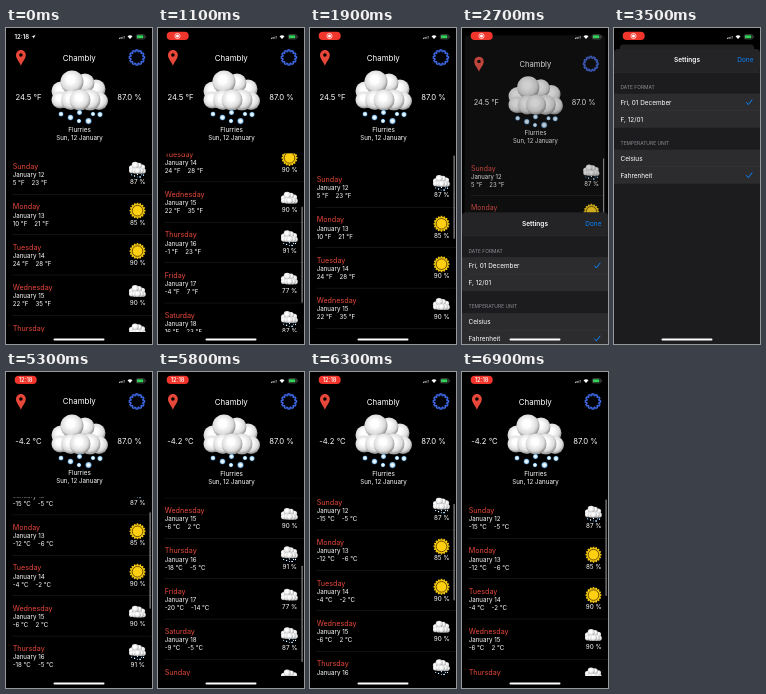
An HTML page for the animation above (7 s loop, 146 by 316 pixels).

```html
<!DOCTYPE html>
<html lang="en">
<head>
<meta charset="utf-8">
<title>Weather</title>
<style>
  html, body { margin: 0; width: 100%; height: 100%; overflow: hidden; background: #000; }
  svg { display: block; width: 146px; height: 316px; }
  text { font-family: Inter, Roboto, "Liberation Sans", sans-serif; }
</style>
</head>
<body>
<svg id="stage" viewBox="0 0 146 316"></svg>
<script>
const W = 146, H = 316, LOOP = 7000;
const LIST = { top: 125.5, bottom: 304, row: 40.4 };
const SHEET_TOP = 21;
const RED = '#e8483a', BLUE = '#0a84ff';

// day, date, low, high (Fahrenheit), humidity, icon
const days = [
  ['Sunday', 12, 5, 23, 87, 'snow'], ['Monday', 13, 10, 21, 85, 'sun'],
  ['Tuesday', 14, 24, 28, 90, 'sun'], ['Wednesday', 15, 22, 35, 90, 'cloud'],
  ['Thursday', 16, -1, 23, 91, 'snow'], ['Friday', 17, -4, 7, 77, 'cloud'],
  ['Saturday', 18, 16, 23, 87, 'snow'], ['Sunday', 19, 12, 20, 87, 'cloud']
];

const text = (x, y, size, str, fill = '#fff', anchor = 'start', weight = 400) =>
  `<text x="${x}" y="${y}" font-size="${size}" fill="${fill}" text-anchor="${anchor}" font-weight="${weight}">${str}</text>`;
const rect = (x, y, w, h, fill, rx = 0, extra = '') =>
  `<rect x="${x}" y="${y}" width="${w}" height="${h}" rx="${rx}" fill="${fill}" ${extra}/>`;
const circle = (x, y, r, attrs) => `<circle cx="${x}" cy="${y}" r="${r}" ${attrs}/>`;
const balls = (list, fill) => list.map(([x, y, r]) => circle(x, y, r, `fill="url(#${fill})"`)).join('');

// Toothed outline alternating between two radii
function cog(x, y, n, inner, outer, duty) {
  const pts = [];
  for (let i = 0; i < n; i++)
    for (const [k, r] of [[-1, inner], [-duty, outer], [duty, outer], [1, inner]]) {
      const a = (i + k * 0.4) * 2 * Math.PI / n;
      pts.push((x + r * Math.cos(a)).toFixed(2) + ',' + (y + r * Math.sin(a)).toFixed(2));
    }
  return pts.join(' ');
}

const clouds =
  balls([[90, 61, 9.5], [79, 55, 9.5], [55, 63, 9.5], [66, 54, 11.5]], 'puff') +
  `<path d="M54 70h42v10h-42z" fill="#b5b5b5"/>` +
  balls([[54, 72, 8.5], [93, 73, 9], [65, 72, 10], [84, 72, 10.5], [74, 72, 10.5]], 'puff');
const snow = balls([[55, 86, 2.6], [64.5, 89.500, 3], [73.5, 84.5, 2.7], [73, 93, 2.3],
  [82.5, 93, 3.3], [87, 86, 2.3], [94, 86.5, 2.8]], 'flake');

const small = (body, y) => `<g transform="translate(131.5 ${y}) scale(.3) translate(-74 -63)">${body}</g>`;
const icons = {
  snow: small(clouds + snow, 140),
  cloud: small(clouds, 142),
  sun: `<polygon points="${cog(131.5, 142.3, 16, 6.8, 8, 0.5)}" fill="#f2c60c"/>` +
    circle(131.5, 142.3, 5.3, 'fill="#ffd012" stroke="#5e4800" stroke-width=".9"')
};

const celsius = f => (f - 32) / 1.8;
const degrees = (f, unit) => Math.round(unit === 'C' ? celsius(f) : f) + ' °' + unit;

const row = (unit, [day, date, low, high, wet, icon], i) =>
  `<g transform="translate(0 ${i * LIST.row})">` +
  text(6.7, 141, 7.2, day, RED) +
  text(6.7, 149.2, 6.2, 'January ' + date) +
  text(6.7, 157.2, 6.2, `${degrees(low, unit)}<tspan dx="7">${degrees(high, unit)}</tspan>`) +
  icons[icon] + text(131.7, 156.3, 6.3, wet + ' %', '#fff', 'middle') +
  rect(6.5, 166, 139, .5, '#242426') + '</g>';

const unitView = unit => `<g id="unit${unit}">` +
  text(22.5, 72.3, 7.7, unit === 'C' ? '-4.2 °C' : '24.5 °F', '#fff', 'middle') +
  `<g clip-path="url(#listClip)"><g class="rows">${days.map((d, i) => row(unit, d, i)).join('')}</g></g></g>`;

const option = (y, label) => rect(0, y, W, 17, '#2c2c2e') + text(6.5, y + 10.9, 6.4, label);
const check = (id, y) =>
  `<path id="${id}" d="M132.3 ${y}l2 2.4l4-5.2" fill="none" stroke="${BLUE}" stroke-width="1"/>`;

const stage = document.getElementById('stage');
stage.innerHTML = `<defs>
  <radialGradient id="puff" cx=".45" cy=".4" r=".62"><stop offset=".25" stop-color="#fff"/>
  <stop offset=".7" stop-color="#dcdcdc"/><stop offset="1" stop-color="#808080"/></radialGradient>
  <radialGradient id="flake"><stop offset=".3" stop-color="#f2faff"/><stop offset=".7" stop-color="#9fd0f2"/>
  <stop offset="1" stop-color="#3f86c4" stop-opacity=".5"/></radialGradient>
  <clipPath id="listClip">${rect(0, LIST.top, W, LIST.bottom - LIST.top, '#fff')}</clipPath></defs>
  <g id="card">
    <path d="M14.9 37.7C13.4 33.5 10 31 10 27a4.9 4.9 0 0 1 9.8 0C19.8 31 16.4 33.5 14.9 37.7z" fill="${RED}"/>
    ${circle(14.9, 27, 1.8, 'fill="#000"')}
    <polygon points="${cog(130.9, 29.5, 12, 6.1, 7.6, 0.5)}" fill="none" stroke="#3b63da" stroke-width="1.5"/>
    ${text(73.3, 32.5, 7.9, 'Chambly', '#fff', 'middle')}
    ${text(123.5, 72.3, 7.7, '87.0 %', '#fff', 'middle')}
    ${clouds}${snow}
    ${text(73.5, 103.5, 6.4, 'Flurries', '#fff', 'middle')}
    ${text(73.5, 111.5, 6.2, 'Sun, 12 January', '#fff', 'middle')}
    ${unitView('F')}${unitView('C')}
    ${rect(143.5, 0, 1.2, 10, '#8e8e8e', .6, 'id="bar"')}
    ${rect(0, 0, W, H, '#3c3c3e', 4, 'id="dim"')}
  </g>
  <g id="sheet">
    ${rect(0, 0, W, 340, '#1c1c1f', 4)}
    ${rect(0, 0, W, 23, '#242427', 4)}${rect(0, 22.7, W, .4, '#3a3a3c')}
    ${text(73, 13.2, 6.5, 'Settings', '#fff', 'middle', 600)}
    ${text(139.5, 13.2, 6.5, 'Done', BLUE, 'end')}
    ${text(6.5, 40, 4.9, 'DATE FORMAT', '#8e8e93')}
    ${option(44.5, 'Fri, 01 December')}${option(61.5, 'F, 12/01')}
    ${rect(6.5, 61.3, 140, .4, '#3f3f42')}
    ${text(6.5, 95.7, 4.9, 'TEMPERATURE UNIT', '#8e8e93')}
    ${option(100.5, 'Celsius')}${option(117.5, 'Fahrenheit')}
    ${rect(6.5, 117.3, 140, .4, '#3f3f42')}
    ${check('dateCheck', 53)}${check('checkC', 109)}${check('checkF', 126)}
  </g>
  <g id="clock">${text(8.5, 11, 6, '12:18', '#fff', 'start', 600)}
    <path d="M25.5 8.8l4-2l-2 4l-.3-1.8z" fill="#fff"/></g>
  <g id="pill">${rect(8.7, 3.8, 22, 8.3, '#f2362c', 4.1)}
    <g id="dot">${circle(19.5, 8, 2.6, 'fill="none" stroke="#fff" stroke-width=".7"')}${circle(19.5, 8, 1.5, 'fill="#fff"')}</g>
    <g id="time">${text(19.6, 10, 5.8, '12:18', '#fff', 'middle', 500)}</g></g>
  ${[0, 1, 2, 3].map(i => rect(113 + i * 1.6, 9.8 - i * .6, 1, 1 + i * .6, i < 2 ? '#fff' : '#777', .2)).join('')}
  <path d="M121.5 8.2a4 4 0 0 1 5 0l-2.5 2.8z" fill="#fff"/>
  ${rect(130.3, 6.6, 8.4, 4.4, 'none', 1.2, 'stroke="#777" stroke-width=".5"')}
  ${rect(131, 7.3, 6.4, 3, '#35d15a', .6)}${rect(139.2, 8, .6, 1.6, '#777', .3)}
  ${rect(47.5, 310.4, 51, 2, '#fff', 1)}`;

const el = id => document.getElementById(id);
const rows = document.querySelectorAll('.rows');
const ramp = (t, a, b) => Math.min(1, Math.max(0, (t - a) / (b - a)));
const show = (id, v) => el(id).setAttribute('opacity', +v);
const move = (node, s) => node.setAttribute('transform', s);

// One flick down the list and back with a rubber-band bounce
const swipe = [[580, 0], [850, 32], [1100, 93], [1300, 121], [1450, 130],
  [1600, 104], [1780, 16], [1900, -13], [2100, -5], [2400, 0]];

function scrollAt(t) {
  if (t > 5000) t -= 4500;
  const i = swipe.findIndex(p => p[0] > t);
  if (i < 1) return 0;
  const slope = k => k < 1 || k > swipe.length - 2 ? 0 :
    (swipe[k + 1][1] - swipe[k - 1][1]) / (swipe[k + 1][0] - swipe[k - 1][0]);
  const [t0, a] = swipe[i - 1], [t1, b] = swipe[i];
  const d = t1 - t0, u = (t - t0) / d, v = 1 - u;
  return a * (1 + 2 * u) * v * v + slope(i - 1) * d * u * v * v +
    b * u * u * (3 - 2 * u) - slope(i) * d * u * u * v;
}

// Critically damped spring from 0 to 1
function spring(t, start, rate) {
  const x = Math.max(0, t - start) * rate;
  return 1 - (1 + x) * Math.exp(-x);
}

function draw(t) {
  const offset = scrollAt(t);
  rows.forEach(r => move(r, `translate(0 ${-offset})`));

  const view = LIST.bottom - LIST.top - 2, ratio = view / (days.length * LIST.row);
  el('bar').setAttribute('y', LIST.top + 2 + Math.max(0, offset) * ratio);
  el('bar').setAttribute('height', view * ratio + Math.min(0, offset));
  show('bar', t < 4000 ? ramp(t, 600, 700) * (1 - ramp(t, 2700, 3000)) : ramp(t, 5050, 5150));

  const open = t < 4200 ? spring(t, 2550, .01) : 1 - spring(t, 4220, .0128);
  move(el('card'), `translate(${73 * .08 * open} ${16.5 * open}) scale(${1 - .08 * open})`);
  move(el('sheet'), `translate(0 ${H - (H - SHEET_TOP) * open})`);
  show('sheet', open > .001);
  show('dim', .55 * open);

  const metric = t >= 3700;
  for (const id of ['unitC', 'checkC']) show(id, metric);
  for (const id of ['unitF', 'checkF']) show(id, !metric);

  const time = ramp(t, 3900, 4100);
  show('clock', 1 - ramp(t, 50, 300));
  show('pill', ramp(t, 50, 500));
  show('dot', 1 - time);
  show('time', time);
}

function tick(now) {
  draw(now % LOOP);
  requestAnimationFrame(tick);
}
draw(0);
requestAnimationFrame(tick);
</script>
</body>
</html>
```
